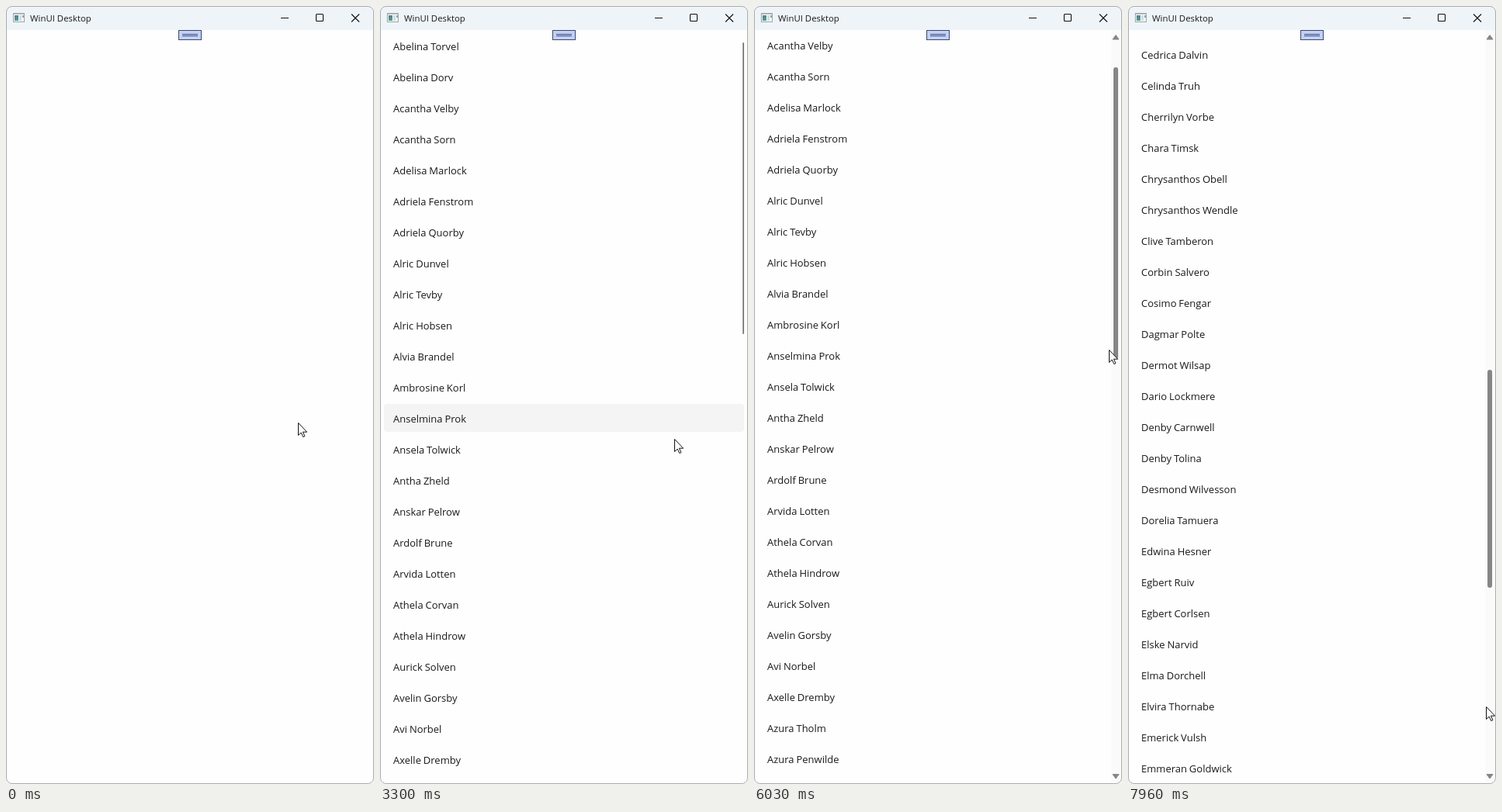
Write an HTML page that moves like this. It is 474 by 1003 pixels and loops after 8 s.

```html
<!DOCTYPE html>
<html lang="en">
<head>
<meta charset="utf-8">
<title>WinUI Desktop</title>
<style>
  html, body { margin: 0; width: 100%; height: 100%; overflow: hidden; background: #f2f2f2; }
  svg { display: block; width: 474px; height: 1003px; }
  text { font-family: "Open Sans", "Noto Sans", sans-serif; fill: #1a1a1a; white-space: pre; }
  .row { font-size: 13px; word-spacing: -0.5px; }
  .title { font-size: 11.4px; }
</style>
</head>
<body>
<svg viewBox="0 0 474 1003">
  <defs>
    <clipPath id="window"><rect width="474" height="1003" rx="8"/></clipPath>
    <clipPath id="client"><rect x="1" y="31" width="472" height="971"/></clipPath>
    <linearGradient id="pane" x2="0" y2="1">
      <stop stop-color="#4f7f9c"/><stop offset="1" stop-color="#56a184"/>
    </linearGradient>
  </defs>

  <g clip-path="url(#window)">
    <rect width="474" height="1003" fill="#fefefe"/>
    <rect width="474" height="31" fill="#eff4f9"/>

    <g id="app-icon">
      <rect x="9.5" y="9.5" width="14" height="11" fill="#f8fafb" stroke="#9aa5ab"/>
      <path d="M10 10.5H23" stroke="#b9c2c7"/>
      <rect x="11" y="12" width="5" height="7" fill="url(#pane)"/>
      <rect x="17" y="12" width="3" height="7" fill="#d5dcdf"/>
      <rect x="21" y="12" width="2" height="3" fill="#8fa9a2"/>
    </g>
    <text class="title" x="31" y="20">WinUI Desktop</text>
    <g fill="none" stroke="#111" stroke-width="1.1">
      <path d="M354 15.5H364M445 10.5L455 20.5M455 10.5L445 20.5"/>
      <rect x="399.5" y="10.5" width="9" height="9" rx="1"/>
    </g>

    <g clip-path="url(#client)">
      <rect id="hover" x="5" width="464" height="36" rx="4" fill="#f4f4f4"/>
      <g id="list"></g>
      <g id="lane">
        <rect x="460" y="31" width="13" height="971" fill="#fafafa"/>
        <path d="M462 43L466 37.5L470 43ZM462 990.5H470L466 996Z" fill="#868686" stroke="#868686" stroke-linejoin="round"/>
      </g>
      <rect id="thumb" fill="#868686"/>
    </g>

    <rect x="222.5" y="31.5" width="29" height="12" fill="#c3d0f3" stroke="#3d486c"/>
    <path d="M227 36.5H247M227 38.5H247" stroke="#3d4f86"/>
    <path id="pointer" d="M.5 .5V16.5L4.2 13.1L6.8 18.6L8.9 17.6L6.4 12.2H11.6Z" fill="#fff" stroke="#111" stroke-linejoin="round"/>
  </g>
  <rect x=".5" y=".5" width="473" height="1002" rx="7.5" fill="none" stroke="#a9acaf"/>
</svg>

<script>
const LOOP = 8000, STEP = 200 / 3, ROW = 40;
const people = `Abelina Torvel,Abelina Dorv,Acantha Velby,Acantha Sorn,Adelisa Marlock,
Adriela Fenstrom,Adriela Quorby,Alric Dunvel,Alric Tevby,Alric Hobsen,Alvia Brandel,
Ambrosine Korl,Anselmina Prok,Ansela Tolwick,Antha Zheld,Anskar Pelrow,Ardolf Brune,
Arvida Lotten,Athela Corvan,Athela Hindrow,Aurick Solven,Avelin Gorsby,Avi Norbel,
Axelle Dremby,Azura Tholm,Azura Penwilde,Bede Orvan,Berenice Yulp,Berenice Halvo,
Bertram Solquez,Birgitta Wendmor,Bronwyne Tarsk,Bruna Jolv,Cadoc Melvorn,
Calantha Orrigand,Caspar Holbren,Cedrica Dalvin,Celinda Truh,Cherrilyn Vorbe,
Chara Timsk,Chrysanthos Obell,Chrysanthos Wendle,Clive Tamberon,Corbin Salvero,
Cosimo Fengar,Dagmar Polte,Dermot Wilsap,Dario Lockmere,Denby Carnwell,Denby Tolina,
Desmond Wilvesson,Dorelia Tamuera,Edwina Hesner,Egbert Ruiv,Egbert Corlsen,
Elske Narvid,Elma Dorchell,Elvira Thornabe,Emerick Vulsh,Emmeran Goldwick`.split(/,\s*/);

// Keys: [time, value, ...]
const pointerKeys = [
  [3233, 376, 537], [3300, 379, 558], [3433, 388, 582], [3567, 403, 591],
  [3767, 432, 535], [3967, 462, 437], [4100, 452, 406],
  [4367, 452, 406], [4500, 447, 401], [4700, 447, 401], [4833, 470, 396],
  [5967, 470, 396], [6100, 443, 490], [6233, 406, 645], [6367, 418, 810],
  [6500, 443, 957], [6633, 461, 982],
  [7100, 461, 982], [7367, 463, 926], [7767, 463, 926], [7967, 461, 903]
];
const dragKeys = [[5967, 0], [6100, 64], [6233, 192], [6367, 354], [6500, 519], [6600, 563]];

const $ = id => document.getElementById(id);
const set = (el, attrs) => { for (const k in attrs) el.setAttribute(k, attrs[k]); };
const clamp = v => Math.max(0, Math.min(1, v));
const ramp = (t, from, to) => clamp((t - from) / (to - from));
const mix = (a, b, p) => a + (b - a) * p;

function sample(keys, t) {
  let i = 1;
  while (i < keys.length - 1 && keys[i][0] < t) i++;
  const p = ramp(t, keys[i - 1][0], keys[i][0]);
  return keys[i].slice(1).map((v, k) => mix(keys[i - 1][k + 1], v, p));
}

const rows = people.map((name, i) => {
  const el = document.createElementNS("http://www.w3.org/2000/svg", "text");
  el.textContent = name;
  set(el, { class: "row", x: 17, y: 57 + i * ROW });
  $("list").append(el);
  return el;
});

function hoveredRow(t) {
  if (t < 1000) return 11;
  const [x, y] = sample(pointerKeys, t - STEP);
  return x < 460 && t < 5000 ? Math.floor((y - 32) / ROW) : -1;
}

function draw(t) {
  const entry = t < 490 ? 0 : 1 - (1 - ramp(t, 470, 1035)) ** 5;
  const slide = Math.round(16 * 2 ** (-Math.max(0, t - 500) / 65));
  const drag = sample(dragKeys, t)[0];
  const shift = slide - Math.round(drag * 2.538);
  const late = ramp(t, 2040, 2430);

  $("list").setAttribute("transform", `translate(0 ${shift})`);
  rows.forEach((el, i) => el.setAttribute("opacity", i < 20 ? entry : late));

  const hovered = hoveredRow(t);
  set($("hover"), { y: 33 + hovered * ROW + shift, opacity: hovered < 0 ? 0 : entry });

  const wide = ramp(t, 5167, 5300);
  const grown = t >= 7160;
  const width = mix(2, 6, wide);
  set($("lane"), { opacity: wide });
  set($("thumb"), {
    x: 469 - width, y: grown ? 469 : Math.round(47 + drag),
    width, height: grown ? 281 : 376, rx: width / 2,
    opacity: t < 3290 ? 0 : 1
  });

  const [x, y] = sample(pointerKeys, t).map(Math.round);
  $("pointer").setAttribute("transform", `translate(${x} ${y})`);
}

function frame() {
  const t = performance.now() % LOOP;
  draw(Math.max(0, STEP / 2 + Math.floor((t - STEP / 2 + 7) / STEP) * STEP));
  requestAnimationFrame(frame);
}
frame();
</script>
</body>
</html>
```
